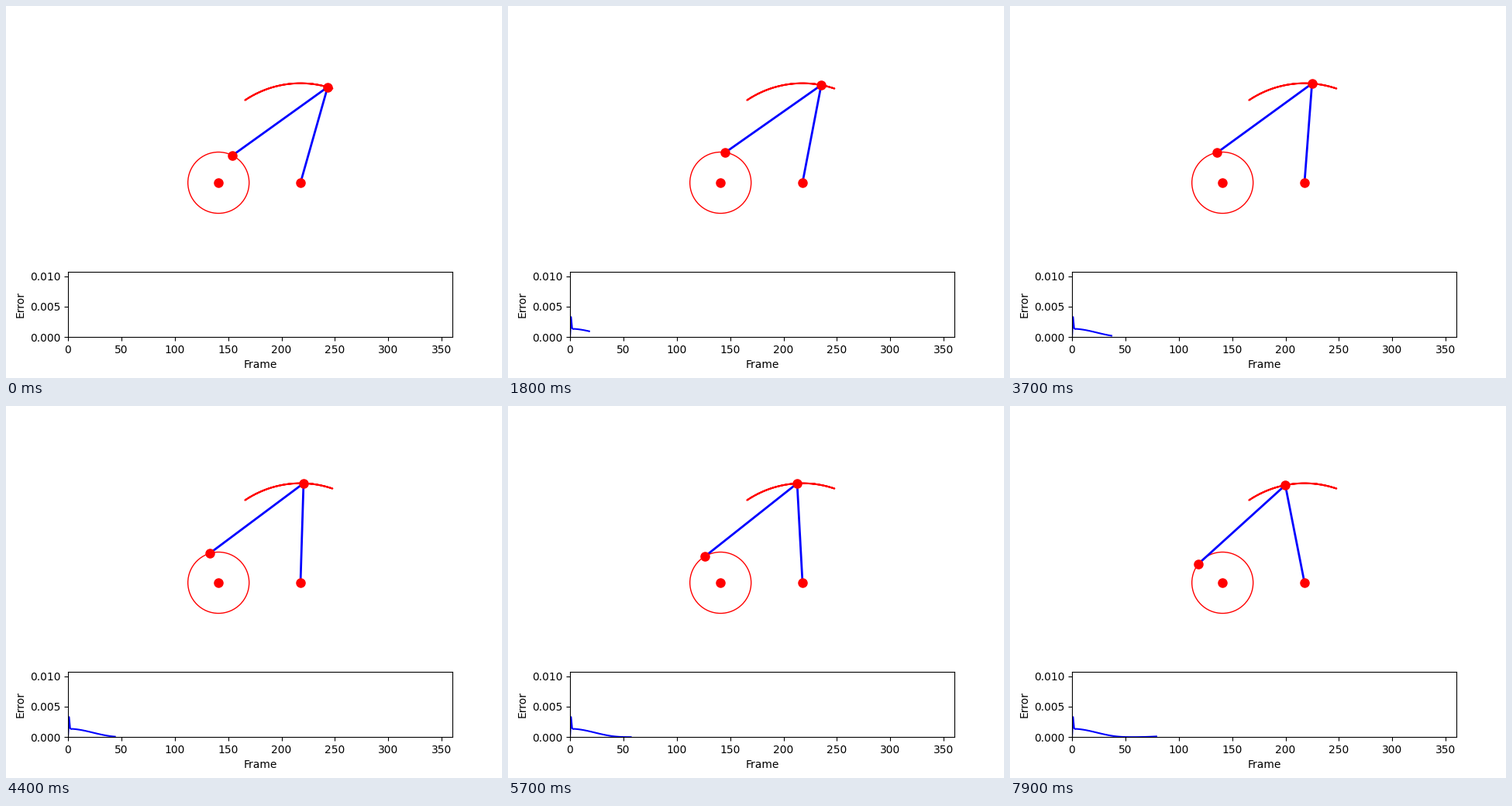
Animation of 640x480 px, one loop 8 s. Source, as a matplotlib script:

```python
import numpy as np
import matplotlib.pyplot as plt
from matplotlib.animation import FuncAnimation

FRAMES, INTERVAL = 80, 100

# Four-bar linkage, lengths in pixels, y pointing down
CRANK, COUPLER, ROCKER = 39.5, 151.3, 128.3
O = np.array([274.2, 228.0])
C = np.array([380.0, 228.0])
START = 63


def crank_pin(deg):
    a = np.radians(deg)
    return O + CRANK * np.array([np.cos(a), -np.sin(a)])


def rocker_pin(deg):
    """Upper intersection of the coupler and rocker circles."""
    a = crank_pin(deg)
    d = C - a
    dist = np.hypot(*d)
    u = d / dist
    along = (COUPLER**2 - ROCKER**2 + dist**2) / (2 * dist)
    height = np.sqrt(COUPLER**2 - along**2)
    return a + along * u + height * np.array([u[1], -u[0]])


def error_curve(n):
    fall = 1.37e-3 * ((1 + np.cos(np.pi * n / 57)) / 2) ** 1.4
    rise = 1.1e-4 * ((n - 57) / 22) ** 2
    err = np.where(n < 57, fall, rise)
    err[:4] = 0, 0.0033, 0.00145, 0.00132
    return err


steps = np.arange(FRAMES)
errors = error_curve(steps)
trace = np.array([rocker_pin(d) for d in range(361)])

fig, (ax, ax_err) = plt.subplots(
    2, 1, figsize=(6.4, 4.8), dpi=100, gridspec_kw={"height_ratios": [3, 1]})
fig.subplots_adjust(left=0.125, right=0.9, bottom=0.11, top=0.88, hspace=0.2)

ax.set_xlim(80, 576)
ax.set_ylim(309.6, 57.6)
ax.axis("off")
ax.add_patch(plt.Circle(O, CRANK, color="red", fill=False))
ax.plot(*trace.T, color="red", lw=1.5)
links, = ax.plot([], [], color="blue", lw=2)
joints, = ax.plot([], [], "o", color="red", ms=8)

ax_err.set_xlim(0, 360)
ax_err.set_ylim(0, 0.0107)
ax_err.set_xlabel("Frame")
ax_err.set_ylabel("Error")
err_line, = ax_err.plot([], [], color="blue")


def update(i):
    a, b = crank_pin(START + i), rocker_pin(START + i)
    links.set_data(*np.array([a, b, C]).T)
    joints.set_data(*np.array([O, a, b, C]).T)
    count = i + 1 if i else 0
    err_line.set_data(steps[:count], errors[:count])
    return links, joints, err_line


anim = FuncAnimation(fig, update, frames=FRAMES, interval=INTERVAL,
                     init_func=lambda: update(0), repeat=True)
plt.show()
```
